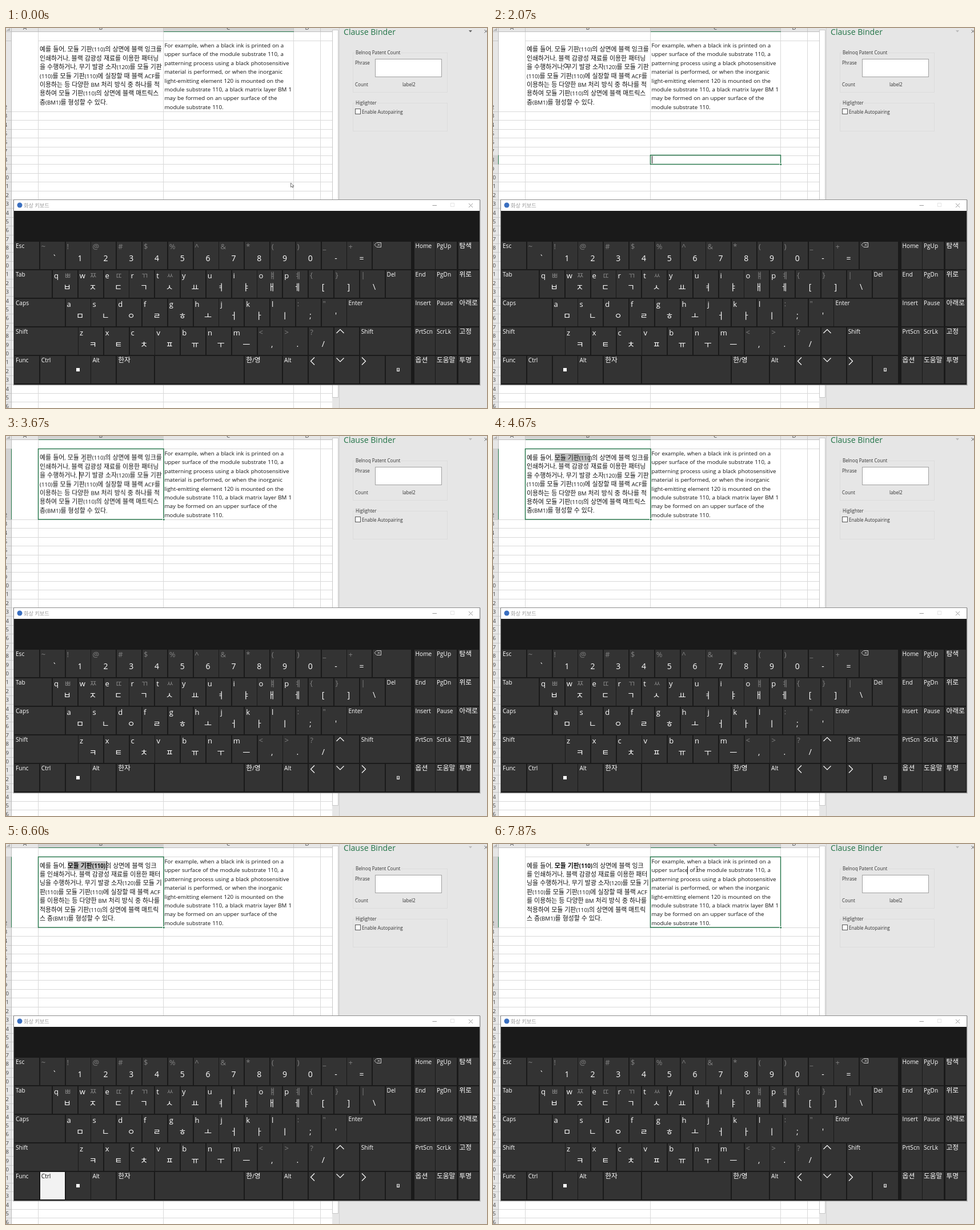
These frames come from a looping animation (842 px wide and 665 px high, 8 s). An HTML page:

```html
<!DOCTYPE html>
<html lang="ko">
<head>
<meta charset="utf-8">
<title>On-screen keyboard demo</title>
<style>
html, body { margin: 0; width: 100%; height: 100%; overflow: hidden; background: #fff; }
svg { display: block; width: 842px; height: 665px; }
text { font-family: "Open Sans", "Noto Sans", sans-serif; white-space: pre; }
.k { font-family: "Noto Sans CJK KR", "Noto Sans CJK", sans-serif; }
.cell { word-spacing: .5px; }
.pick { fill: none; stroke: #217346; stroke-width: 1.4; }
.caret { fill: #111; }

.s { animation: 8s step-end infinite; }
#selB { animation-name: selB; }
#selC8 { animation-name: selC8; }
#selC2 { animation-name: selC2; }
#headC { animation-name: headC; }
#dim { animation-name: dim; }
#edit1 { animation-name: edit1; }
#edit2 { animation-name: edit2; }
#edit3 { animation-name: edit3; }
#edit4 { animation-name: edit4; }
#plain { animation-name: plain; }
#bold { animation-name: bold; }
#ctrl { animation-name: ctrl; }
#arrow { animation-name: arrow; }
#cross { animation-name: cross; }
#beam { animation-name: beam; }
#mark { animation: mark 8s linear infinite; }
#bar { animation: bar 8s linear infinite; }
#ptr { animation: ptr 8s linear infinite; }

@keyframes selB { 0%, 14.125%, 95%, 100% { opacity: 0 } 8.375%, 26.625% { opacity: 1 } }
@keyframes selC8 { 0%, 26.625%, 100% { opacity: 0 } 14.125% { opacity: 1 } }
@keyframes selC2 { 0% { opacity: 0 } 95%, 100% { opacity: 1 } }
@keyframes headC { 0%, 14.125%, 95%, 100% { opacity: 1 } 8.375%, 26.625% { opacity: 0 } }
@keyframes dim { 0%, 26.625%, 95% { fill: #666 } 18.375%, 30%, 96.625%, 100% { fill: #bbb } }
@keyframes edit1 { 0%, 26.625%, 100% { opacity: 0 } 18.375% { opacity: 1 } }
@keyframes edit2 { 0%, 53.375%, 100% { opacity: 0 } 30.875% { opacity: 1 } }
@keyframes edit3 { 0%, 95%, 100% { opacity: 0 } 82.5% { opacity: 1 } }
@keyframes edit4 { 0% { opacity: 0 } 96.625%, 100% { opacity: 1 } }
@keyframes plain {
  0% { opacity: 1; transform: none }
  26.625% { opacity: 1; transform: translateY(.5px) }
  82.5%, 100% { opacity: 0 }
}
@keyframes bold { 0% { opacity: 0 } 82.5%, 100% { opacity: 1 } }
@keyframes ctrl { 0%, 85.875%, 100% { opacity: 0 } 74.125% { opacity: 1 } }
@keyframes arrow { 0% { opacity: 1 } 1.25%, 100% { opacity: 0 } }
@keyframes cross {
  0%, 18.375%, 26.625%, 96.625%, 100% { opacity: 0 }
  1.25%, 21.625%, 85% { opacity: 1 }
}
@keyframes beam {
  0%, 21.625%, 75.875% { opacity: 0 }
  18.375%, 26.625%, 96.625%, 100% { opacity: 1 }
}
@keyframes mark {
  0%, 53.375% { width: 0 }
  55.875%, 58.375% { width: 62px }
  60%, 82.499% { width: 66px }
  82.5%, 94.999% { width: 69px }
  95%, 100% { width: 0 }
}
@keyframes bar {
  0%, 69.9% { opacity: 0 }
  70.875%, 74.12% { opacity: 1 }
  74.125%, 100% { opacity: 0 }
}
@keyframes ptr {
  0%, .875% { transform: translate(501px, 275px) }
  5.875%, 8.375% { transform: translate(140px, 33px) }
  14.125%, 21.625% { transform: translate(400px, 230px) }
  25.875% { transform: translate(127px, 66px) }
  29.125%, 33.375% { transform: translate(127px, 68px) }
  35.875%, 40.875% { transform: translate(145px, 74px) }
  45.875% { transform: translate(136px, 40px) }
  49.125%, 53.375% { transform: translate(110px, 40px) }
  55.875%, 58.375% { transform: translate(169px, 40px) }
  60%, 85% { transform: translate(174px, 40px) }
  88.375%, 95% { transform: translate(339px, 38px) }
  96.625% { transform: translate(339px, 46px) }
  98.375%, 100% { transform: translate(357px, 44px) }
}
</style>
</head>
<body>
<svg viewBox="0 0 842 665">
  <rect width="842" height="665" fill="#fff"/>
  <g id="sheet"></g>

  <g id="selB" class="s"></g>
  <g id="selC8" class="s"></g>
  <g id="selC2" class="s"></g>
  <g id="labels"></g>

  <rect id="mark" x="108" y="30" width="0" height="16" fill="#c0c0c0"/>
  <g id="plain" class="s"></g>
  <g id="bold" class="s"></g>
  <g id="english"></g>
  <rect id="edit1" class="s caret" x="278" y="224" width="1" height="13"/>
  <rect id="edit2" class="s caret" x="128" y="62" width="1" height="14"/>
  <rect id="edit3" class="s caret" x="176" y="30" width="1" height="16"/>
  <rect id="edit4" class="s caret" x="340" y="39" width="1" height="14"/>

  <g id="panel"></g>
  <g id="bar"></g>
  <g id="board"></g>
  <g id="ctrl" class="s"></g>

  <g id="ptr">
    <path id="arrow" class="s" d="M-2.500-4V3.500L-.7 2 .6 4.500 1.800 4 .7 1.500H3z" fill="#fff" stroke="#555" stroke-width=".8"/>
    <path id="cross" class="s" d="M-1.300-3.500H1.300V-1.300H3.500V1.300H1.300V3.500H-1.300V1.300H-3.500V-1.300H-1.300z" fill="#fff" stroke="#333" stroke-width=".9"/>
    <path id="beam" class="s" d="M-2-4.500H-.5L0-4 .5-4.500H2M0-4V4M-2 4.500H-.5L0 4 .5 4.500H2" fill="none" stroke="#444" stroke-width=".9"/>
  </g>
</svg>
<script>
const put = (id, ...parts) => { document.getElementById(id).innerHTML = parts.flat(Infinity).join(''); };
const esc = s => s.replace(/&/g, '&amp;').replace(/</g, '&lt;');

// Hangul runs get their own face, slightly larger than the Latin text.
const text = (x, y, s, size, fill = '#111', attrs = '') =>
  `<text x="${x}" y="${y}" font-size="${size}" fill="${fill}" ${attrs}>` +
  esc(s)
    .replace(/[\u3131-\uD7A3]+/g, m => `<tspan class="k" font-size="${size * 1.12}">${m}</tspan>`)
    .replace(/\*(.+?)\*/g, '<tspan font-weight="700">$1</tspan>') + '</text>';
const rect = (x, y, w, h, fill, attrs = '') =>
  `<rect x="${x}" y="${y}" width="${w}" height="${h}" fill="${fill}" ${attrs}/>`;
const line = (d, stroke, width = 1) =>
  `<path d="${d}" fill="none" stroke="${stroke}" stroke-width="${width}"/>`;
const MID = 'text-anchor="middle"';

// Worksheet
const ROW = 15.4, GRID = '#d9d9d9', HEAD = '#e6e6e6', GREEN = '#217346';
const rowLine = n => Math.round(146 + ROW * (n - 2)) + .5;
const rows = Array.from({ length: 35 }, (_, i) => i + 2);

put('sheet',
  line('M57 22.5H571' + rows.map(n => `M10 ${rowLine(n)}H571`).join(''), GRID),
  line('M56.500 7V665M275.500 7V665M503.500 7V665M550.500 7V665', GRID),
  rect(0, 0, 571, 6, HEAD), rect(0, 0, 9, 665, HEAD),
  line('M0 6.500H571M9.500 0V665', '#bdbdbd'),
  line('M0 22.500H9' + rows.map(n => `M0 ${rowLine(n)}H9`).join(''), '#c6c6c6'),
  line('M56.500 0V6M275.500 0V6M503.500 0V6M550.500 0V6', '#c6c6c6'),
  '<path d="M0 5H7V0z" fill="#b4b4b4"/>',
  '<g id="headC" class="s">', rect(276, 0, 227, 6, '#d2d2d2'), rect(276, 6, 228, 1, GREEN), '</g>');

put('labels',
  ['A', 'B', 'C', 'D'].map((c, i) => text([33, 166, 389, 527][i], 3, c, 9.75, '#444', MID)),
  rows.map(n => text(-.5, 141.700 + ROW * (n - 2), '' + n, 9.5, '#444', MID)));

const pick = (x, y, w, h) =>
  rect(0, y, 9, h, '#d2d2d2') + rect(9, y, 1, h, GREEN) +
  `<rect class="pick" x="${x}" y="${y}" width="${w}" height="${h}"/>` +
  rect(x + w - 2, y + h - 2, 4, 4, '#fff') + rect(x + w - 1, y + h - 1, 2.5, 2.5, GREEN);
put('selB', rect(57, 0, 219, 6, '#d2d2d2'), rect(57, 6, 219, 1, GREEN), pick(56.5, 22.5, 219.5, 123.5));
put('selC8', pick(275.5, 222.5, 228, 16));
put('selC2', pick(275.5, 22.5, 228, 123.5));

const lines = (x, y, all) =>
  all.trim().split('\n').map((s, i) => text(x, y + i * ROW, s.trim(), 9.75, '#111', 'class="cell"'));

put('plain', lines(59, 41.4, `
  예를 들어, 모듈 기판(110)의 상면에 블랙 잉크를
  인쇄하거나, 블랙 감광성 재료를 이용한 패터닝
  을 수행하거나, 무기 발광 소자(120)를 모듈 기판
  (110)를 모듈 기판(110)에 실장할 때 블랙 ACF를
  이용하는 등 다양한 BM 처리 방식 중 하나를 적
  용하여 모듈 기판(110)의 상면에 블랙 매트릭스
  층(BM1)를 형성할 수 있다.`));
put('bold', lines(59, 41.6, `
  예를 들어, *모듈 기판(110)*의 상면에 블랙 잉크
  를 인쇄하거나, 블랙 감광성 재료를 이용한 패터
  닝을 수행하거나, 무기 발광 소자(120)를 모듈 기
  판(110)를 모듈 기판(110)에 실장할 때 블랙 ACF
  를 이용하는 등 다양한 BM 처리 방식 중 하나를
  적용하여 모듈 기판(110)의 상면에 블랙 매트릭
  스 층(BM1)를 형성할 수 있다.`));
put('english', lines(277.5, 34, `
  For example, when a black ink is printed on a
  upper surface of the module substrate 110, a
  patterning process using a black photosensitive
  material is performed, or when the inorganic
  light-emitting element 120 is mounted on the
  module substrate 110, a black matrix layer BM 1
  may be formed on an upper surface of the
  module substrate 110.`));

// Scroll bar and side panel
const small = (x, y, s) => text(x, y, s, 8.1, '#333');
const group = (y, h) => rect(607.5, y, 165, h, 'none', 'stroke="#dcdcdc"');
put('panel',
  rect(571, 0, 271, 665, HEAD),
  rect(571.5, 3.5, 10, 643, '#fff', 'stroke="#c8c8c8"'),
  line('M583.500 0V665', '#d0d0d0'),
  text(591, 12, 'Clause Binder', 14.1, GREEN),
  '<path id="dim" class="s" d="M810 4H816L813 7.500z"/>',
  line('M837.500 3L843 8.500M843 3L837.500 8.500', '#666'),
  group(43.5, 69), group(131.5, 49),
  rect(610, 40, 82, 8, HEAD), rect(610, 128, 40, 8, HEAD),
  small(612, 46, 'Belnoq Patent Count'), small(611, 64, 'Phrase'),
  rect(646.5, 54.5, 116, 31, '#fff', 'stroke="#a0a0a0"'),
  small(611, 102, 'Count'), small(694, 102, 'label2'),
  small(612, 134, 'Higlighter'), small(623, 149.500, 'Enable Autopairing'),
  rect(611.5, 141.5, 9, 9, '#fff', 'stroke="#555"'));

// Floating format bar
const tick = (x, y) => line(`M${x} ${y}l1.500 1.500 1.500-1.500`, '#555', .9);
put('bar',
  rect(173, 0, 87, 31, '#000', 'opacity=".12"'),
  rect(171.5, -2, 87, 31, '#fff', 'stroke="#c8c8c8"'),
  rect(174.5, -8, 81, 15.5, '#fff', 'stroke="#d0d0d0"'), line('M224.500 0V7', '#d0d0d0'),
  text(175, 5, '푸른 들체', 8.3, '#555'), text(227, 6, '11', 8.5, '#444'),
  tick(219, 2), tick(250.500, 2),
  text(177, 21, '*가*', 7.2, '#333'), text(191, 21, '가', 7.2, '#555', 'font-style="italic"'),
  text(206, 20, '*가*', 7.2, '#333'), rect(205, 22, 10, 2.500, '#e02020'), tick(220, 18),
  text(228, 21, '가', 7.5, '#444'), line('M236.500 16l1.500-1.500 1.500 1.500', '#3a6fb0'),
  text(245, 21, '가', 6.8, '#444'), line('M251.500 14.500l1.500 1.500 1.500-1.500', '#3a6fb0'));

// Keyboard
const KEY = 44.8, GREY = '#808080';
const keyTop = r => 374 + Math.round(r * 50.1);
const cap = (x, end, r, fill = '#333') =>
  rect(Math.round(x), keyTop(r), Math.round(end) - Math.round(x), 48, fill);
const wide = (r, x, end, s, fill, ink = '#fff') =>
  cap(x, end, r, fill) + text(x + 2, keyTop(r) + 11, s, /[가-힣]/.test(s) ? 10.5 : 10.1, ink);
const chars = (r, x0, low, main, high) => [...main].map((c, i) => {
  const x = x0 + KEY * i, y = keyTop(r), jamo = c > '\u3130';
  const up = high[i] || ' ';
  return cap(x, x + 43, r) +
    text(x + 25, y + (jamo ? 35 : 34), c, jamo ? 12.8 : 14, '#fff', MID) +
    (low[i]
      ? text(x + 2, y + 13.5, low[i], 13, '#fff') + text(x + 26, y + 14, up, 12, GREY, MID)
      : text(x + 2, y + 13, up, 13, GREY));
});
const side = [
  ['Home', 'PgUp', '탐색'], ['End', 'PgDn', '위로'], ['Insert', 'Pause', '아래로'],
  ['PrtScn', 'ScrLk', '고정'], ['옵션', '도움말', '투명']
];
const chevron = d => line(d, '#fff', 1.2);

put('board',
  rect(12, 301, 819, 325, '#000', 'opacity=".12"'),
  rect(13, 300, 817, 325, '#8c8c8c'),
  rect(14, 301, 815, 19, '#fff'), rect(14, 320, 815, 304, '#1a1a1a'),
  '<circle cx="24" cy="310" r="4.500" fill="#3a6fc0"/>',
  text(31, 313.500, '화상 키보드', 8.3, '#999'),
  line('M746.500 310.500H754M810 307L817 314M817 307L810 314', '#999'),
  rect(778.5, 306.5, 6, 6, 'none', 'stroke="#e4e4e4"'),
  wide(0, 15, 58, 'Esc'), chars(0, 59.8, '', '`1234567890-=', '~!@#$%^&*()_+'), cap(642.2, 709, 0),
  wide(1, 15, 80, 'Tab'),
  chars(1, 82, 'qwertyuiop', 'ㅂㅈㄷㄱㅅㅛㅕㅑㅐㅔ[]\\', 'ㅃㅉㄸㄲㅆ   ㅒㅖ{}|'),
  wide(1, 664.6, 709, 'Del'),
  wide(2, 15, 103, 'Caps'), chars(2, 104.6, 'asdfghjkl', 'ㅁㄴㅇㄹㅎㅗㅓㅏㅣ;\'', '         :"'),
  wide(2, 597.4, 709, 'Enter'),
  wide(3, 15, 126, 'Shift'), chars(3, 127, 'zxcvbnm', 'ㅋㅌㅊㅍㅠㅜㅡ,./', '       <>?'),
  cap(575, 618, 3), wide(3, 619.8, 709, 'Shift'),
  wide(4, 15, 58, 'Func'), wide(4, 59.8, 103, 'Ctrl'), cap(104.6, 148, 4), wide(4, 149.4, 192, 'Alt'),
  wide(4, 194.2, 259, '한자'), cap(261.4, 416, 4), wide(4, 418.2, 483, '한/영'), wide(4, 485, 528, 'Alt'),
  cap(530, 573, 4), cap(575, 618, 4), cap(619.8, 663, 4), cap(664.6, 709, 4),
  side.map((names, r) => names.map((s, i) => wide(r, [714.6, 752, 791.5][i], [750.5, 789, 828][i], s))),
  chevron('M578.500 534L585 527.500 591.500 534'),
  chevron('M578.500 577.500L585 584 591.500 577.500'),
  chevron('M540 576.500L533.500 583 540 589.500'),
  chevron('M623 576.500L629.500 583 623 589.500'),
  line('M645 379.500L649 375.500H656.500V383.500H649zM650.500 377.500L654.500 381.500M654.500 377.500L650.500 381.500', '#ddd', .9),
  rect(123, 595, 6, 6, '#fff'),
  rect(684.5, 595.5, 4, 5, 'none', 'stroke="#ddd"'), line('M685 597.500H688M685 599.500H688', '#ddd', .7));

put('ctrl', wide(4, 59.8, 103, 'Ctrl', '#f2f2f2', '#111'));
</script>
</body>
</html>
```
